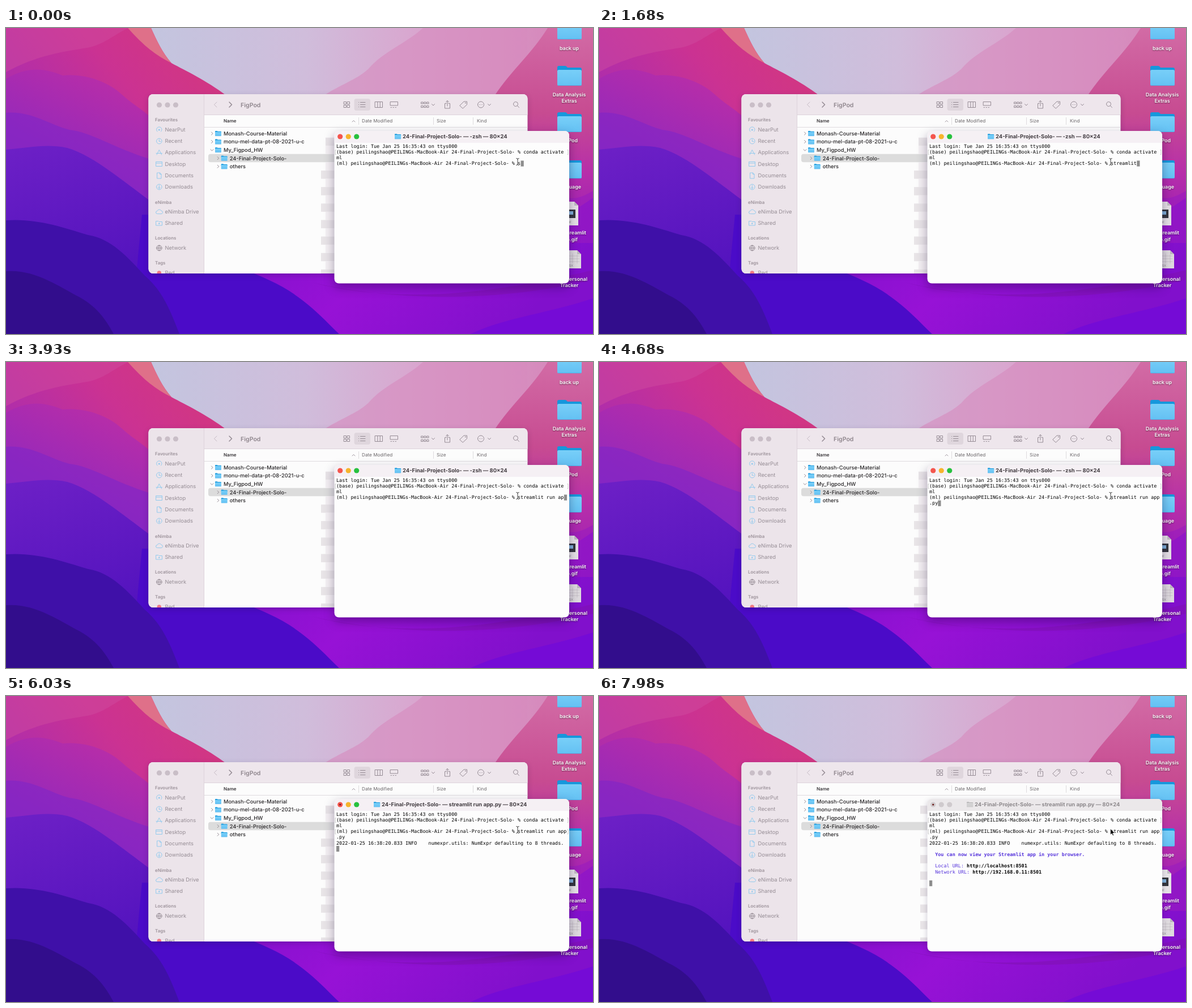
Animation of 1036 by 541 pixels, one loop 8000 ms. Source, as an HTML page:

```html
<!DOCTYPE html>
<html lang="en">
<head>
<meta charset="utf-8">
<title>Terminal session</title>
<style>
  html, body { margin: 0; width: 100%; height: 100%; overflow: hidden; background: #4a0ac4; }
  svg { display: block; width: 1036px; height: 541px; }
  text { font-family: Inter, "Liberation Sans", sans-serif; text-rendering: geometricPrecision; white-space: pre; }
  .mono text { font: 8.45px "DejaVu Sans Mono", "Liberation Mono", monospace; }
  .mono .b { font-weight: 700; }
  .desk { fill: #fff; font-weight: 600; text-shadow: 0 1px 2px rgba(0,0,0,.55); }
  .line { fill: none; stroke: #958b94; stroke-linecap: round; stroke-linejoin: round; }
  #finder { filter: drop-shadow(0 3px 5px rgba(20,0,50,.22)); }
  #term { filter: drop-shadow(0 7px 9px rgba(20,0,50,.36)); }
  #term.off { filter: drop-shadow(0 3px 5px rgba(20,0,50,.22)); }
  .off #lights circle { fill: #cfcacd; }
  .off #bar { fill: #ebe8ea; }
  .off #title { fill: #8d898c; }
  .off #icon { filter: grayscale(1); opacity: .5; }
</style>
</head>
<body>
<svg viewBox="0 0 1036 541">
  <defs>
    <linearGradient id="sky" x1="254" x2="1036" gradientUnits="userSpaceOnUse">
      <stop stop-color="#c3c5df"/><stop offset=".35" stop-color="#d0bddb"/>
      <stop offset=".6" stop-color="#d9a6cf"/><stop offset="1" stop-color="#d57fb5"/>
    </linearGradient>
    <linearGradient id="rose" x1="1" y1="0" x2="0" y2=".7">
      <stop stop-color="#d63a78"/><stop offset=".45" stop-color="#cb3292"/><stop offset="1" stop-color="#a02bb8"/>
    </linearGradient>
    <linearGradient id="mag" x1=".7" y1="0" x2=".2" y2="1">
      <stop stop-color="#bb2ea6"/><stop offset="1" stop-color="#7d25c8"/>
    </linearGradient>
    <linearGradient id="violet" x2=".2" y2="1">
      <stop stop-color="#6d20c6"/><stop offset="1" stop-color="#4d10bc"/>
    </linearGradient>
    <linearGradient id="edge" y1="0" x2="0" y2="1">
      <stop stop-color="#d26ba5"/><stop offset=".35" stop-color="#c74b91"/>
      <stop offset=".6" stop-color="#b62eaa"/><stop offset="1" stop-color="#8613bd"/>
    </linearGradient>
    <linearGradient id="low" x2="1" y2=".4">
      <stop stop-color="#7c0fca"/><stop offset=".5" stop-color="#9712d6"/><stop offset="1" stop-color="#8110cc"/>
    </linearGradient>
    <linearGradient id="front" x2="0" y2="1">
      <stop stop-color="#78cff8"/><stop offset="1" stop-color="#64c1f3"/>
    </linearGradient>
    <clipPath id="fclip"><rect x="251.5" y="117" width="669" height="317" rx="8"/></clipPath>
    <clipPath id="tclip"><rect x="579.5" y="182" width="414.5" height="269.5" rx="8"/></clipPath>
    <g id="folder">
      <path d="M0 4q0-3 3-3h11q2 0 4 3h22q3 0 3 3v8H0z" fill="#1697dc"/>
      <rect y="8" width="43" height="28" rx="2.5" fill="url(#front)"/>
      <path d="M1 35.5h41" stroke="#4fb0e6"/>
    </g>
    <path id="ibeam" d="M900.8 230.5q2 0 2.2 1.5q.2-1.5 2.2-1.5M903 232V241M900.8 242.5q2 0 2.2-1.5q.2 1.5 2.2 1.5"/>
  </defs>

  <g id="wall">
    <path d="M0 0H1036V541H0z" fill="url(#sky)"/>
    <path d="M736 0C705 28 665 42 640 72C618 92 590 100 560 120H920V0z" fill="#d88abf" opacity=".6"/>
    <path d="M956 0C928 45 892 75 862 120V430H1036V0z" fill="url(#edge)"/>
    <path d="M0 0H256C266 22 276 44 292 62C318 76 352 92 390 120V320H0z" fill="url(#rose)"/>
    <path d="M215 0H256C266 22 276 44 292 62C262 48 238 26 215 0z" fill="#df7089"/>
    <path d="M0 0H216C190 12 172 30 143 35C100 42 55 48 0 78z" fill="#d04a9f" opacity=".5"/>
    <path d="M0 90C40 66 70 72 100 84C140 80 180 95 205 118C222 134 240 143 260 162V330H0z" fill="url(#mag)"/>
    <path d="M0 150C45 146 78 172 112 180C150 184 190 212 255 232V330H0z" fill="#8226c6" opacity=".65"/>
    <path d="M0 215C40 212 70 204 108 212C150 224 190 258 255 306V541H0z" fill="url(#violet)"/>
    <path d="M240 330H660V541H220z" fill="#4b0bc8"/>
    <path d="M0 340C52 336 100 352 145 366C185 372 215 405 245 438C278 466 292 505 306 541H0z" fill="#3f10a8"/>
    <path d="M0 430C50 426 92 456 130 476C165 496 178 520 190 541H0z" fill="#320d8c"/>
    <path d="M415 425C458 442 490 455 524 482C550 502 568 522 588 541H1036V300C900 400 700 420 415 425z" fill="url(#low)"/>
    <path d="M540 450C690 488 850 472 1036 428V445C900 478 720 490 540 450z" fill="#8011b4" opacity=".6"/>
    <path d="M820 541C880 512 955 505 1036 478V541z" fill="#750bd6"/>
    <path d="M990 300C1006 304 1022 296 1036 288V380H990z" fill="#9a1cc0" opacity=".6"/>
  </g>
  <g id="desktop"></g>

  <g id="finder"><g clip-path="url(#fclip)">
    <path d="M251 117H921V434H251z" fill="#fcfcfc"/>
    <path d="M251 117H350V434H251z" fill="#ece4ea"/>
    <path d="M350 117H921V153H350z" fill="#eee6ec"/>
    <path d="M349.5 117V434M350 153.5H921" stroke="#ddd3db"/>
    <path d="M350 175.5H921M622.5 158V171M754.5 158V171M824.5 158V171" stroke="#dedbde"/>
    <rect x="357" y="222.8" width="300" height="14.4" rx="4" fill="#dcdcdc"/>
    <g id="files"></g>
  </g></g>
  <g id="stripes"></g>

  <g id="term"><g clip-path="url(#tclip)">
    <path d="M579 182H994V452H579z" fill="#fdfdfd"/>
    <path id="bar" d="M579 182H994V203H579z" fill="#f5f0f4"/>
    <g id="lights">
      <circle cx="589.7" cy="192" r="4.6" fill="#f4554d"/>
      <circle cx="604.2" cy="192" r="4.6" fill="#f6b42c"/>
      <circle cx="618.7" cy="192" r="4.6" fill="#27c13e"/>
    </g>
    <circle id="busy" cx="589.7" cy="192" r="1.6" fill="#6b1a17"/>
    <use id="icon" href="#folder"/>
    <text id="title" y="195.3" font-size="9.45" font-weight="700" fill="#433d42"></text>
    <g class="mono" id="rows"></g>
    <rect id="caret" width="5.2" height="10.2" fill="#8d8d8d"/>
    <path id="marks" fill="none" stroke="#bdbdbd" stroke-width=".8"/>
  </g></g>
  <g id="beam" fill="none" stroke-linecap="round">
    <use href="#ibeam" stroke="#fff" stroke-width="2"/>
    <use href="#ibeam" stroke="#222" stroke-width=".9"/>
  </g>
  <path id="arrow" d="M902.5 234.5V245.5L905.1 243.2L906.9 247L908.6 246.2L906.9 242.5H910.3z" stroke="#fff" stroke-width=".8"/>
</svg>

<script>
const $ = id => document.getElementById(id);
const label = (x, y, s, size, attrs = '') =>
  `<text x="${x}" y="${(y + size * .36).toFixed(2)}" font-size="${size}" ${attrs}>${s}</text>`;
const folder = (x, y, k = 1) => `<use href="#folder" transform="translate(${x} ${y}) scale(${k})"/>`;
const line = (d, attrs = '') => `<path class="line" d="${d}" ${attrs}/>`;
const dot = (x, y, r, fill) => `<circle cx="${x}" cy="${y}" r="${r}" fill="${fill}"/>`;

function desktop() {
  const mid = 'class="desk" text-anchor="middle"', end = 'class="desk" text-anchor="end"';
  return [-16, 66, 148, 230].map(y => folder(973, y)).join('') +
    '<path d="M978 307H1003L1010 314V349H978z" fill="#e6e2e6"/><path d="M1003 307V314H1010z" fill="#c0bbc1"/>' +
    '<path d="M984 321H1005V336H984z" fill="#34363d"/><path d="M989 324H1001V330H989z" fill="#7fb0d8"/>' +
    label(994, 343, 'GIF', 5, 'fill="#888" text-anchor="middle"') +
    '<path d="M978 393H1008L1015 400V425H978z" fill="#dedade"/><path d="M1008 393V400H1015z" fill="#bdb8be"/>' +
    line('M982 403H1012M982 408H1012M982 413H1012M990 399V416M1000 399V416M1008 401V416', 'stroke-width=".5" opacity=".6"') +
    label(994, 420, 'XLSX', 5.5, 'fill="#888" text-anchor="middle"') +
    label(994, 36, 'back up', 8.9, mid) + label(994, 118, 'Data Analysis', 8.9, mid) +
    label(994, 129, 'Extras', 8.9, mid) + label(1009, 199, 'FigPod', 8.9, end) +
    label(1015, 281, 'Language', 8.9, end) + label(1024, 362, 'Streamlit', 8.9, end) +
    label(1009, 373.5, 'demo.gif', 8.9, end) + label(1026, 443.5, 'Personal', 8.9, end) +
    label(994, 455, 'Tracker', 8.9, mid);
}

function sidebar() {
  const heads = [['Favourites', 162], ['eNimba', 308], ['Locations', 371.5], ['Tags', 415]];
  const items = [['NearPut', 179.5], ['Recent', 200], ['Applications', 220], ['Desktop', 240.5], ['Documents', 261],
    ['Downloads', 281], ['eNimba Drive', 324.5], ['Shared', 345], ['Network', 389], ['Red', 433]];
  const tint = '#93cbee', blue = `style="stroke:${tint}"`;
  const ring = y => `M265.5 ${y}a4.8 4.8 0 1 0 9.6 0a4.8 4.8 0 1 0-9.6 0`;
  return heads.map(([s, y]) => label(263, y, s, 7.9, 'font-weight="600" fill="#9c929a"')).join('') +
    items.map(([s, y]) => label(280.5, y, s, 9.4, 'fill="#958c94"')).join('') +
    [270.5, 285, 299.5].map(x => dot(x, 136, 4.6, '#c9bec7')).join('') +
    dot(270.3, 180, 1.6, tint) +
    line('M267 183a4.7 4.7 0 1 1 6.6 0', blue) +
    line(ring(200) + 'M270.3 197V200.5H273', blue) +
    line('M266 224L270.3 215.5L274.6 224M265 221.5H275.6', blue) +
    line('M265 236.5H275.5V244.5H265zM265 239H275.5', blue) +
    line('M267 256H271.5L274 258.5V266H267zM271.5 256V258.5H274', blue) +
    line(ring(281) + 'M270.3 278V284M268.3 282L270.3 284L272.3 282', blue) +
    line('M267 328.5a2.5 2.5 0 0 1 0-5a3.8 3.8 0 0 1 7-.3a2.7 2.7 0 0 1 .5 5.3z', blue) +
    line('M265 341.5H269L270 342.5H275.5V349H265z', blue) + dot(270.3, 345.7, 1.3, tint) +
    line(ring(389) + 'M265.5 389H275M270.3 384.2q-4 4.8 0 9.6q4-4.8 0-9.6') +
    dot(270.3, 433, 3.7, '#f17a84');
}

function toolbar() {
  const cells = [596.5, 602.5].flatMap(x => [130.5, 136.5].map(y => `M${x} ${y}h4v4h-4z`)).join('');
  const group = [733, 738, 743].map(x => `M${x} 131h3v3h-3zM${x} 137.5h3v3h-3z`).join('');
  return '<rect x="614.5" y="125" width="28.5" height="21" rx="4" fill="#dfd6dd"/>' +
    line('M372 131L367.5 135.5L372 140', 'opacity=".45"') +
    line('M394 131L398.5 135.5L394 140', 'stroke-width="1.5"') +
    label(414, 136, 'FigPod', 10.6, 'font-weight="600" fill="#8f868d"') +
    line(cells) + line(group) +
    line('M625.5 131.5H634M625.5 135.5H634M625.5 139.5H634M622.5 131.5h.1M622.5 135.5h.1M622.5 139.5h.1') +
    line('M651.5 130.5H664.5V140.5H651.5zM655.8 130.5V140.5M660.2 130.5V140.5') +
    line('M678.5 130.5H691.5V137H678.5zM679 140.5h1.5M683 140.5h1.5M687 140.5h1.5') +
    line('M751.5 134.5L754 137L756.5 134.5M850.5 134.5L853 137L855.5 134.5') +
    line('M777 133.5H774.5V142H783.5V133.5H781M779 138V128.5M776.5 131L779 128.5L781.5 131') +
    line('M801 137L808 130H813.5V135.5L806.5 142z') + dot(811, 132.5, .9, '#958b94') +
    line('M832.5 135.5a5.5 5.5 0 1 0 11 0a5.5 5.5 0 1 0-11 0M835.5 135.5h.1M838 135.5h.1M840.5 135.5h.1') +
    line('M895.5 134.5a4 4 0 1 0 8 0a4 4 0 1 0-8 0M902.5 137.5L905.5 140.5');
}

function files() {
  const list = [['Monash-Course-Material', 0], ['monu-mel-data-pt-08-2021-u-c', 0], ['My_Figpod_HW', 0, 1],
    ['24-Final-Project-Solo-', 1], ['others', 1]];
  const head = 'fill="#6c686b"';
  return label(384, 164.5, 'Name', 8, 'font-weight="600" fill="#383538"') + line('M611 166L613.5 163.5L616 166', 'stroke-width=".9"') +
    label(628, 164.5, 'Date Modified', 8.2, head) + label(760, 164.5, 'Size', 8.2, head) + label(831, 164.5, 'Kind', 8.2, head) +
    list.map(([s, deep, open], i) => {
      const x = deep * 10.7, y = 186.5 + i * 14.57;
      return line(open ? `M361 ${y - 1}l2.5 2.5l2.5-2.5` : `M${362.5 + x} ${y - 2.5}l2.5 2.5l-2.5 2.5`) +
        folder(369 + x, y - 4.7, .255) + label(384 + x, y, s, 9.3, 'font-weight="500" fill="#262426"');
    }).join('');
}

$('desktop').innerHTML = desktop();
$('files').innerHTML = sidebar() + toolbar() + files();

const CW = 5.087, LH = 10.17, X0 = 583, Y0 = 204;
const PROMPT = 'peilingshao@PEILINGs-MacBook-Air 24-Final-Project-Solo- % ';
const COMMAND = 'streamlit run app.py', WRAP = 17;
const KEYS = [180, 480, 630, 780, 1080, 1230, 1380, 1680, 2280, 3180, 3330, 3480, 3630, 3780, 3930, 4080, 4230, 4530, 4680];
const ENTER = 5130, RETITLE = 5280, INFO = 6030, READY = 7080, BLUR = 7980, LOOP = 8000;

function row(i, s, attrs = '') {
  return `<text x="${X0}" y="${(Y0 + i * LH + 7.8).toFixed(2)}" ${attrs}>${s}</text>`;
}
const bracket = i => {
  const y = Y0 + i * LH + 1.5;
  return `M582.5 ${y}h-1.5v8h1.5M990.5 ${y}h1.5v8h-1.5`;
};

// alternating list rows showing through the window's soft edge
function stripes(off) {
  let bands = '';
  for (let i = 1; i < 18; i++) {
    if (i === 3) continue;
    const odd = i % 2, x = off ? 567 : odd && i > 3 ? 556 : 564;
    const y = 179.2 + i * 14.57, h = Math.min(14.57, 434 - y);
    if (odd || !off) bands += `<rect x="${x}" y="${y}" width="${580 - x}" height="${h}" fill="${odd ? '#e8e4e7' : '#f4f0f3'}"/>`;
  }
  return bands;
}

let shown = '';
function draw(t) {
  const n = 1 + KEYS.filter(k => t >= k).length;
  const stage = [ENTER, RETITLE, INFO, READY, BLUR].filter(k => t >= k).length;
  if (shown === n + '/' + stage) return;
  shown = n + '/' + stage;

  const typed = COMMAND.slice(0, n);
  let rows = row(0, 'Last login: Tue Jan 25 16:35:43 on ttys000') +
    row(1, '(base) ' + PROMPT + 'conda activate') + row(2, 'ml') +
    row(3, '(ml) ' + PROMPT + typed.slice(0, WRAP)) + row(4, typed.slice(WRAP));
  if (t >= INFO) rows += row(5, '2022-01-25 16:38:20.833 INFO    numexpr.utils: NumExpr defaulting to 8 threads.');
  if (t >= READY) {
    const url = (name, s) => `  <tspan fill="#5634dc">${name} URL: </tspan><tspan class="b">${s}</tspan>`;
    rows += row(7, '  You can now view your Streamlit app in your browser.', 'class="b" fill="#5634dc"') +
      row(9, url('Local', 'http://localhost:8501')) + row(10, url('Network', 'http://192.168.0.11:8501'));
  }
  $('rows').innerHTML = rows;

  const [line, col] = t >= READY ? [12, 0] : t >= INFO ? [6, 0] : t >= ENTER ? [5, 0] :
    n < WRAP ? [3, 63 + n] : [4, n - WRAP];
  $('caret').setAttribute('x', X0 + col * CW);
  $('caret').setAttribute('y', Y0 + line * LH);
  $('marks').setAttribute('d', bracket(1) + (t >= ENTER ? bracket(3) : ''));

  const running = t >= RETITLE, off = t >= BLUR;
  $('title').textContent = `24-Final-Project-Solo- — ${running ? 'streamlit run app.py' : '-zsh'} — 80×24`;
  $('title').setAttribute('x', running ? 663 : 700);
  $('icon').setAttribute('transform', `translate(${running ? 649 : 686} 187) scale(.26)`);
  $('busy').style.display = running ? '' : 'none';
  $('term').setAttribute('class', off ? 'off' : '');
  $('beam').style.display = off ? 'none' : '';
  $('arrow').style.display = off ? '' : 'none';
  $('stripes').innerHTML = stripes(off);
}

function tick(now) {
  draw(now % LOOP);
  requestAnimationFrame(tick);
}
draw(0);
requestAnimationFrame(tick);
</script>
</body>
</html>
```
